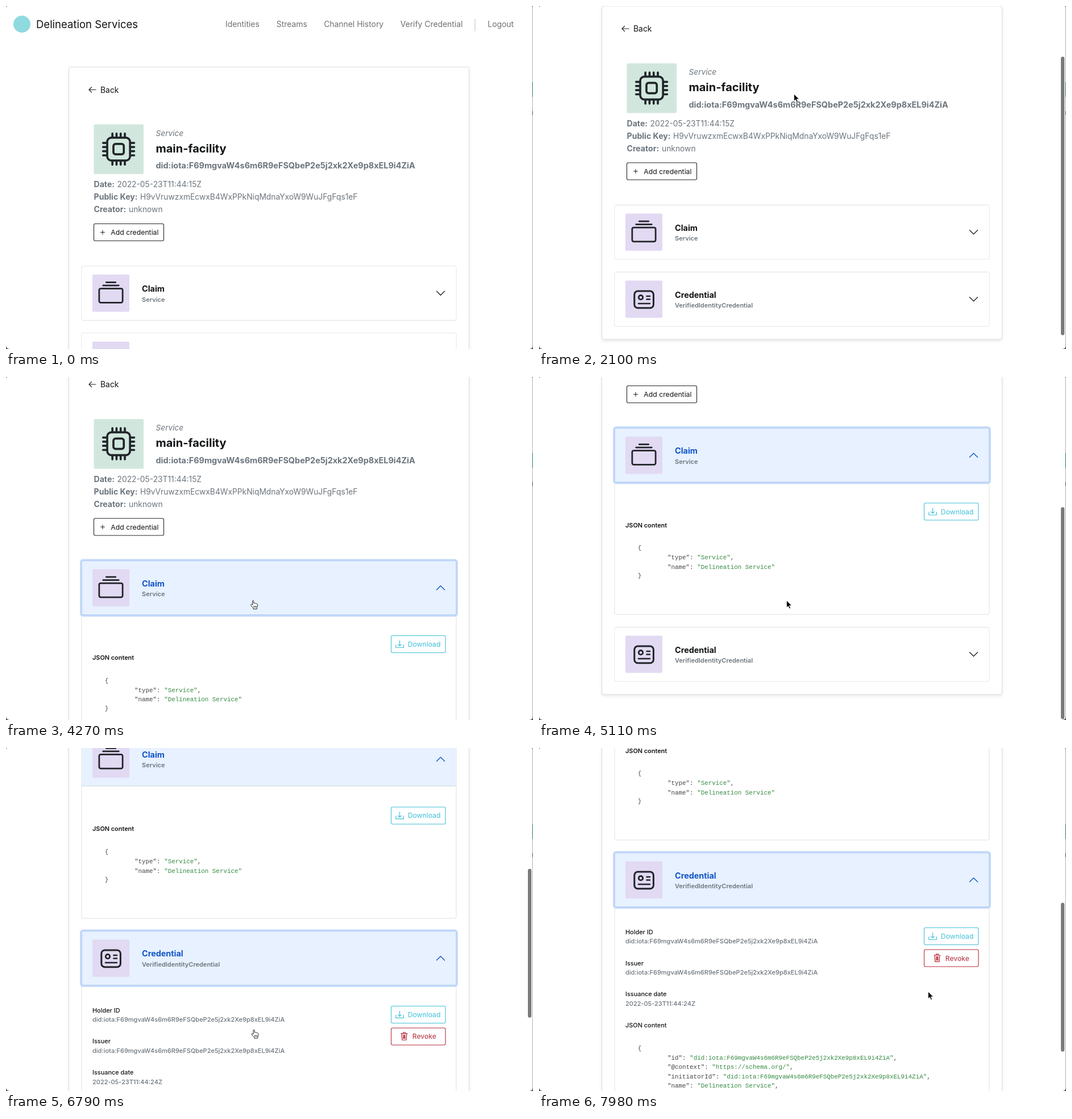
An HTML page that plays this animation: 927 by 604 pixels, repeating every 8000 ms.

```html
<!DOCTYPE html>
<html lang="en">
<head>
<meta charset="utf-8">
<title>Identity page</title>
<style>
html, body { margin: 0; width: 100%; height: 100%; overflow: hidden; background: #fff; }
svg { display: block; }
#stage { width: 100vw; height: 100vh; font-family: Inter, sans-serif; }
text { white-space: pre; }
.mono { font-family: "Liberation Mono", monospace; font-size: 10.87px; fill: #444; }
.mono tspan { fill: #348a40; }
.line { fill: none; stroke-linecap: round; stroke-linejoin: round; }
#card { filter: drop-shadow(0 3px 2.5px rgba(0, 0, 0, .08)); }
</style>
</head>
<body>
<svg id="stage" viewBox="0 0 927 604" preserveAspectRatio="none"></svg>
<script>
const LOOP = 8000, STEP = 70;
const INK = '#212529', DARK = '#121416', GREY = '#6c757d', EDGE = '#dfdfdf', CYAN = '#41c0d9', RED = '#b52b3a';
const DID = 'did:iota:F69mgvaW4s6m6R9eFSQbeP2e5j2xk2Xe9p8xEL9i4ZiA';
const $ = id => document.getElementById(id);

// Markup helpers
const text = (x, y, s, size, fill = DARK, weight = 400, more = '') =>
  `<text x="${x}" y="${y}" font-size="${size}" fill="${fill}" font-weight="${weight}" ${more}>${s}</text>`;
const line = (d, stroke = INK, w = 1.2, more = '') =>
  `<path class="line" d="${d}" stroke="${stroke}" stroke-width="${w}" ${more}/>`;
const box = (x, y, w, h, r, fill, stroke = 'none', sw = 1, more = '') =>
  `<rect x="${x}" y="${y}" width="${w}" height="${h}" rx="${r}" fill="${fill}" stroke="${stroke}" stroke-width="${sw}" ${more}/>`;

// Icon on a 16-unit grid
function chip() {
  let pins = '';
  for (const o of [5, 7, 9, 11]) pins += `M${o} .5V2M${o} 14V15.5M.5 ${o}H2M14 ${o}H15.5`;
  return box(154.5, 208.5, 87.5, 87.5, 2, '#d1e7dd') +
    '<g transform="translate(168.9 222.800) scale(3.65)">' + line(pins, INK, 1) +
    box(2.5, 2.5, 11, 11, 2, 'none', INK) + box(5.5, 5.5, 5, 5, 1, 'none', INK) + '</g>';
}

const stackIcon = '<g transform="translate(162.500 25.750) scale(2.75)">' +
  box(.5, 5, 15, 9, 1, 'none', INK) + line('M3 3H13M5 1H11', INK, 1) + '</g>';
const cardIcon = box(167.8, 33.6, 33.6, 29.6, 6, 'none', INK, 3) +
  `<circle cx="179" cy="44.7" r="3.7" fill="none" stroke="${INK}" stroke-width="2.8"/>` +
  line('M189.500 42.500H195M189.500 48H195M175 55.500H195', INK, 2.6);

function button(y, label, color, tx, icon) {
  return `<g transform="translate(0 ${y})">` + box(677.5, .5, 95.5, 30, 2.5, '#fff', color, 1.1) +
    line(icon, color, 1.2) + text(tx, 20, label, 12.2, color) + '</g>';
}
const download = button(35.5, 'Download', CYAN, 706.7,
  'M692.5 9.5V18.5M689.5 15.7L692.5 18.7L695.5 15.7M685.8 16.5V21.5H699.3V16.5');
const revoke = button(74, 'Revoke', RED, 714.8,
  'M694.8 10.5H706M698.5 10.5V8.3H702.3V10.5M696 10.5L696.8 21.8H704L704.8 10.5M698.9 12.8V19.3M700.4 12.8V19.3M701.9 12.8V19.3');

const mono = (x, y, s) => `<text class="mono" x="${x}" y="${y}">${s}</text>`;
const code = (y, rows) => mono(173.7, y - 1, '{') + rows.map(([k, v], i) =>
  mono(226, y + (i + 1) * 16.4, `"${k}": <tspan>"${v}"</tspan>${i < rows.length - 1 ? ',' : ''}`)).join('') +
  mono(173.7, y - 1 + (rows.length + 1) * 16.4, '}');

const claimBody = download + text(152, 78.5, 'JSON content', 10.9, DARK, 600) +
  code(119, [['type', 'Service'], ['name', 'Delineation Service']]);

const field = (y, name, value) =>
  text(152, y, name, 10.9, DARK, 500) + text(152, y + 16.4, value, 11, GREY, 500);
const credentialBody = download + revoke +
  field(47.5, 'Holder ID', DID) + field(102, 'Issuer', DID) +
  field(156.7, 'Issuance date', '2022-05-23T11:44:24Z') +
  text(152, 211.5, 'JSON content', 10.9, DARK, 500) +
  code(252, [['id', DID], ['@context', 'https://schema.org/'], ['initiatorId', DID],
    ['name', 'Delineation Service'], ['type', 'Service']]);

// Accordion item; y = 0 is its top edge
function item(n, title, sub, icon, body) {
  return `<g id="item${n}">` +
    box(133, 0, 659, 95.5, 3, '#fff', EDGE, 1, `id="frame${n}"`) +
    `<svg id="body${n}" x="0" y="96" width="927" height="0" overflow="hidden">${body}</svg>` +
    box(133.5, .5, 658, 94.5, 2.5, '#fff', 'none', 1, `id="head${n}"`) +
    line('M133.500 95H791.500', '#cfd6df', 1, `id="rule${n}"`) +
    `<g id="ring${n}">` + box(131.6, -1.4, 661.8, 98.3, 4, 'none', '#c5dafa', 3) +
    box(133.2, .2, 658.6, 95.1, 2.5, 'none', '#aecbf7', 1) + '</g>' +
    box(152, 15, 65, 65.5, 2, '#e2d9f3') + icon +
    text(239, 45, title, 14.4, DARK, 700, `id="title${n}"`) +
    text(239, 62.5, sub, 11, GREY, 600) +
    line('M757.500 44.300L764.500 51.300L771.500 44.300', INK, 1.4, `id="chev${n}"`) + '</g>';
}

const nav = [[386, 'Identities'], [475.8, 'Streams'], [559.2, 'Channel History'],
  [693.7, 'Verify Credential'], [847.3, 'Logout']];
const facts = [[319.3, 'Date:', 195.5, '2022-05-23T11:44:15Z'],
  [341.2, 'Public Key:', 236, 'H9vVruwzxmEcwxB4WxPPkNiqMdnaYxoW9WuJFgFqs1eF'],
  [363, 'Creator:', 216, 'unknown']];

$('stage').innerHTML = box(0, 0, 927, 604, 0, '#fff') + '<g id="page">' +
  '<circle cx="28" cy="32" r="15" fill="#8fdadf"/>' +
  text(53, 39, 'Delineation Services', 18.5) +
  nav.map(([x, s]) => text(x, 37.3, s, 13.9, '#707070')).join('') +
  line('M825 23.500V44', '#c8c8c8', 1.2) +
  box(110.5, 107.5, 704, 587, 4, '#fff', '#dcdcdc', 1, 'id="card"') +
  line('M158 147.500H146M150.500 143L146 147.500L150.500 152', INK, 1.2) +
  text(166, 152.7, 'Back', 13.9) + chip() +
  text(263.5, 228.7, 'Service', 13.7, GREY, 400, 'font-style="italic"') +
  text(263.5, 257.5, 'main-facility', 20, DARK, 700) +
  text(263.5, 286, DID, 14.43, GREY, 700) +
  facts.map(([y, k, x, v]) => text(154.5, y, k, 14.1, GREY, 700) + text(x, y, v, 13.82, GREY)).join('') +
  box(154.5, 383.5, 123, 30, 2.5, '#fff', INK, 1.1) +
  line('M166.500 398.500H173.500M170 395V402', INK, 1.1) +
  text(184.3, 403, 'Add credential', 12.25) +
  item(1, 'Claim', 'Service', stackIcon, claimBody) +
  item(2, 'Credential', 'VerifiedIdentityCredential', cardIcon, credentialBody) + '</g>' +
  box(918, 0, 6.3, 100, 3.1, '#7b7b7b', 'none', 1, 'id="thumb"') +
  // window edge
  '<path d="M926.2 0h.8v604h-.8z" fill="#9a9a9a"/>' +
  '<path d="M926 134h1v26h-1z" fill="#1f7a4a"/><path d="M926 185h1v7h-1z" fill="#444"/>' +
  '<path d="M0 597Q0 604 7 604H0ZM927 597Q927 604 920 604H927ZM0 3Q0 0 3 0H0ZM927 3Q927 0 924 0H927Z" fill="#4c4f52"/>' +
  '<path id="arrow" d="M0 0V12.5L2.9 9.9L4.9 14.4L7 13.5L5 9.1H9Z" fill="#000" stroke="#fff" stroke-width=".8"/>' +
  '<path id="hand" d="M3.5 8.5V1.7C3.5 .2 5.7 .2 5.7 1.7V5.5C6.2 4.7 7.7 4.9 7.9 5.9C8.6 5.2 10 5.5 10.2 6.5C11.1 6 12.5 6.5 12.5 7.8C12.6 11 12 12 11.3 13.5V15.5H5V13.8L.7 9.3C-.2 8 1.5 6.8 2.5 7.7ZM6 10V13M8 10V13M10 10V13" fill="#fff" stroke="#222" stroke-width="1" stroke-linejoin="round"/>';

// Timing helpers
const clamp = v => Math.max(0, Math.min(1, v));
const easeOut = p => 1 - (1 - p) ** 2;
const smooth = p => p * p * (3 - 2 * p);
const ease = p => smooth(easeOut(p) * .5 + p * .5);

// Keys are [time, value, ...]; returns the eased values at t
function track(keys, t, fn) {
  const i = keys.findIndex(k => k[0] > t);
  if (i === 0) return keys[0].slice(1);
  if (i < 0) return keys[keys.length - 1].slice(1);
  const a = keys[i - 1], b = keys[i], p = fn((t - a[0]) / (b[0] - a[0]));
  return a.slice(1).map((v, j) => v + (b[j + 1] - v) * p);
}
const within = (spans, t) => spans.some(([a, b]) => t >= a && t < b);
const mix = (a, b, p) => `rgb(${a.map((v, i) => Math.round(v + (b[i] - v) * p))})`;

const SCROLL = [[1330, 0], [1750, 107.5], [2100, 107.5], [2380, 133.5], [3500, 133.5], [3570, 134.5],
  [4270, 134.5], [4690, 310], [4760, 310], [5110, 368], [6530, 368], [7000, 515.5], [7210, 515.5], [7770, 624]];
const POINTER = [[210, 466, 606], [770, 448.5, 155], [2520, 448.5, 155], [2800, 437, 490], [2940, 437, 490],
  [3220, 435.5, 393.5], [5390, 435.5, 393.5], [5740, 437, 496], [7350, 437, 496], [7910, 684.5, 429]];
const HAND = [[2800, 3010], [3570, 4340], [5670, 6930]];
const BARS = [[1330, 2590], [4280, 5460], [6540, LOOP]];
const RINGS = { 1: [[3570, 5810]], 2: [[2870, 3570], [5810, LOOP]] };
const OPEN = { 1: 3535, 2: 5860 }, BODY = { 1: 232.5, 2: 412 };

function openItem(n, t, y) {
  const since = t - OPEN[n], h = BODY[n] * ease(clamp(since / 370));
  const tint = clamp(since / 150), turn = 180 * ease(clamp(since / 400));
  $('item' + n).setAttribute('transform', `translate(0 ${y})`);
  $('frame' + n).setAttribute('height', 95.5 + h);
  $('body' + n).setAttribute('height', h);
  $('head' + n).setAttribute('fill', mix([255, 255, 255], [231, 241, 255], tint));
  $('title' + n).setAttribute('fill', mix([18, 20, 22], [16, 84, 200], tint));
  $('chev' + n).setAttribute('stroke', mix([33, 37, 41], [16, 84, 200], tint));
  $('chev' + n).setAttribute('transform', `rotate(${-turn} 764.5 47.8)`);
  $('rule' + n).setAttribute('opacity', tint);
  $('ring' + n).setAttribute('opacity', within(RINGS[n], t) ? 1 : 0);
  return h;
}

function draw(t) {
  const [top] = track(SCROLL, t, easeOut);
  $('page').setAttribute('transform', `translate(0 ${-top})`);
  const h1 = openItem(1, t, 458), h2 = openItem(2, t, 576 + h1);
  $('card').setAttribute('height', 587 + h1 + h2);

  const total = 739 + h1 + h2;
  $('thumb').setAttribute('y', 2 + top * 600 / total);
  $('thumb').setAttribute('height', 600 * 604 / total);
  const shown = BARS.map(([a, b]) => t < a ? 0 : 1 - clamp((t - b) / 250));
  $('thumb').setAttribute('opacity', Math.max(...shown));

  const [x, y] = track(POINTER, t, smooth), hand = within(HAND, t);
  $('arrow').setAttribute('transform', `translate(${x} ${y})`);
  $('hand').setAttribute('transform', `translate(${x - 5.5} ${y - .5})`);
  $('arrow').setAttribute('opacity', hand ? 0 : 1);
  $('hand').setAttribute('opacity', hand ? 1 : 0);
}

const start = performance.now();
function tick() {
  const t = (performance.now() - start) % LOOP;
  draw(Math.floor(t / STEP) * STEP);
  requestAnimationFrame(tick);
}
tick();
</script>
</body>
</html>
```
